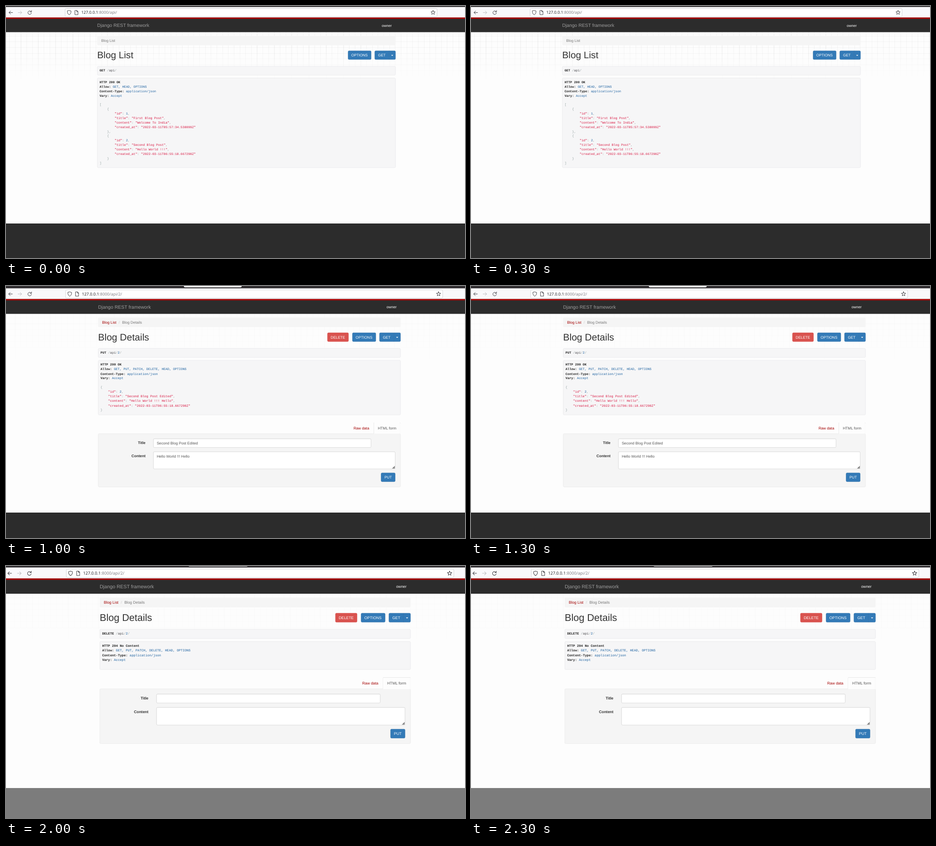
These frames come from a looping animation (1009 px wide and 555 px high, 2.5 s). An HTML page:

```html
<!DOCTYPE html>
<html lang="en">
<head>
<meta charset="utf-8">
<title>Blog API</title>
<style>
html, body { margin: 0; width: 100%; height: 100%; overflow: hidden; background: #fdfdfd; }
* { box-sizing: border-box; }
#stage { position: relative; width: 1009px; height: 555px; overflow: hidden; }
.scene {
  position: absolute; inset: 0; overflow: hidden; background: #fdfdfd; visibility: hidden;
  animation: show 2500ms step-end infinite;
}
@keyframes show {
  0% { visibility: visible; }
  20%, 100% { visibility: hidden; }
}
.page {
  position: absolute; left: 0; top: 0; width: 1140px; transform-origin: 0 0;
  font: 14px/20px "Liberation Sans", Arial, sans-serif; color: #333;
  text-rendering: geometricPrecision;
}
.page div, .page svg { position: absolute; white-space: pre; }
.footer { position: absolute; left: 0; right: 0; bottom: 0; }

.grid {
  background:
    repeating-linear-gradient(90deg, #0000 0 20px, var(--line) 20px 22px),
    repeating-linear-gradient(#0000 0 20px, var(--line) 20px 22px);
  -webkit-mask: linear-gradient(#000 40%, #0000);
  mask: linear-gradient(#000 40%, #0000);
}
.strip { background: #312e31; }
.tab-top { background: #f6f6f7; border-radius: 0 0 5px 5px; }
.tools { background: #f9f9fb; }
.url { background: #fff; border: 1.5px solid #bcbcc2; border-radius: 5px; }
.addr { font: 15.3px/20px "Open Sans", "Noto Sans", sans-serif; color: #77767c; }
.addr b { font-weight: 400; color: #15141a; }
.nav { background: #2c2c2c; border-top: 5px solid #b00505; }
.brand { font-size: 18px; color: #9d9d9d; }
.user { color: #fff; }

.crumbs { background: #f5f5f5; border-radius: 4px; padding: 8px 15px; color: #777; }
.crumbs a, .link { color: #a30000; }
.crumbs s { text-decoration: none; color: #ccc; padding: 0 5px; }
.title { font-size: 36px; line-height: 40px; }
.btn {
  height: 34px; padding: 6px 0; text-align: center; color: #fff;
  background: #337ab7; border: 1px solid #2e6da4; border-radius: 4px;
}
.red { background: #d9534f; border-color: #d43f3a; }
.plain { background: #fff; border-color: #ccc; color: #333; }
.first { border-radius: 4px 0 0 4px; }
.last { border-radius: 0 4px 4px 0; }
.caret { border: 4px solid transparent; border-top-color: #fff; border-bottom: 0; }

.code {
  padding: 8px; background: #f6f6f7; border: 1px solid #e1e1e5; border-radius: 4px;
  font: 12px/17.143px "Liberation Mono", "Courier New", monospace; color: #48484c;
}
.code b { color: #222; }
.code i { font-style: normal; color: #195f9f; }
.code em { font-style: normal; color: #d8143f; }
.code u { text-decoration: none; color: #93a1a1; }

.tab { background: #fdfdfd; border: 1px solid #ddd; border-bottom: 0; border-radius: 4px 4px 0 0; padding: 10px 0; text-align: center; color: #555; }
.well { background: #f5f5f5; border: 1px solid #e3e3e3; border-radius: 4px; }
.label { font-weight: 700; text-align: right; }
.field { background: #fff; border: 1px solid #c6c6c6; border-radius: 4px; padding: 6px 12px; color: #555; box-shadow: inset 0 1px 1px rgba(0,0,0,.075); }
.grip { background: linear-gradient(135deg, #0000 50%, #888 50%); }

.shade { background: rgba(0,0,0,.5); }
.modal { background: #fff; border: 1px solid rgba(0,0,0,.2); border-radius: 6px; box-shadow: 0 5px 15px rgba(0,0,0,.5); }
.ask { font-size: 18px; text-align: center; }
.rule { background: #e5e5e5; }
</style>
</head>
<body>
<div id="stage"></div>
<script>
const LINE = 17.143, RESPONSE_TOP = 231.3;
const METHODS = "GET, PUT, PATCH, DELETE, HEAD, OPTIONS";

const post = (id, title, content, stamp, pad) => [
  `"id": ${id},`, `"title": "${title}",`, `"content": "${content}",`,
  `"created_at": "2022-03-11T${stamp}Z"`
].map(row => pad + row);

const edited = {
  path: "/api/2/", verb: "PUT", status: "200 OK", allow: METHODS,
  body: ["{", ...post(2, "Second Blog Post Edited", "Hello World !!! Hello", "06:55:18.667290", "    "), "}"],
  fields: ["Second Blog Post Edited", "Hello World !!! Hello"], tab: 323
};

const scenes = [
  {
    x: 200.5, y: 25.4, scale: .5754, footer: 479, path: "/api/", verb: "GET",
    status: "200 OK", allow: "GET, HEAD, OPTIONS", list: true, line: "rgba(0,0,0,.035)",
    body: ["[", "    {", ...post(1, "First Blog Post", "Welcome To India", "05:57:34.538099", "        "), "    },",
      "    {", ...post(2, "Second Blog Post", "Hello World !!!", "06:55:18.667290", "        "), "    }", "]"]
  },
  {
    x: 212, y: 27, scale: .6, footer: 492, path: "/api/2/", verb: "GET",
    status: "404 Not Found", allow: METHODS, body: ["{", '    "detail": "Not found."', "}"],
    fields: ["", ""], tab: 550
  },
  { ...edited, x: 202.5, y: 28.7, scale: .5833, footer: 498.5 },
  { ...edited, x: 201.5, y: 28.3, scale: .5855, footer: 555, modal: true },
  {
    x: 206, y: 27.5, scale: .5995, footer: 489, footColor: "#7c7c7c", path: "/api/2/", verb: "DELETE",
    status: "204 No Content", allow: METHODS, body: [], fields: ["", ""], tab: 325
  }
];

const box = (cls, x, y, w, h, html = "") =>
  `<div class="${cls}" style="left:${x}px;top:${y}px;width:${w}px;height:${h}px">${html}</div>`;

const icon = (x, path, color = "#3a393f", size = 20) =>
  `<svg viewBox="-10 -10 20 20" width="${size}" height="${size}" fill="none" stroke="${color}" stroke-width="1.7"
    stroke-linejoin="round" stroke-linecap="round" style="left:${x - size / 2}px;top:${-19 - size / 2}px"><path d="${path}"/></svg>`;

const star = "M" + Array.from({ length: 10 }, (_, k) => {
  const r = k % 2 ? 3.7 : 8.6, a = k * Math.PI / 5;
  return `${(r * Math.sin(a)).toFixed(1)} ${(-r * Math.cos(a)).toFixed(1)}`;
}).join("L") + "Z";

const json = text => text.replace(/("[^"]*")|(\d+)|([[\]{},:])/g, (m, str, num) =>
  str ? `<em>${m}</em>` : num ? `<i>${m}</i>` : `<u>${m}</u>`);

const header = (name, value) => `<b>${name}:</b> <i>${value}</i>`;

function drawBrowser(s) {
  return box("strip", -400, -60, 1900, 20) +
    (s.tab ? box("tab-top", s.tab, -60, 218, 16) : "") +
    box("tools", -400, -40.5, 1900, 41) +
    icon(-330.5, "M7 0H-7M-1 -6L-7 0L-1 6") +
    icon(-295, "M-7 0H7M1 -6L7 0L1 6", "#bdbdc1") +
    icon(-258, "M6 -3A6.8 6.8 0 1 0 6.8 1.5M7 -8V-2.5H1.5") +
    box("url", -123, -35.3, 1422, 32) +
    icon(-107.5, "M0 -8L7 -6C7.5 1 5 6 0 8.5C-5 6 -7.5 1 -7 -6Z") +
    icon(-79, "M-5.5 -8H1.5L5.5 -4V8H-5.5ZM1 -8V-3.5H5.5") +
    box("addr", -61, -29.3, 300, 20, `<b>127.0.0.1</b>:8000${s.path}`) +
    icon(1283, star);
}

function drawHeading(s) {
  const name = s.list ? "Blog List" : "Blog Details";
  const trail = s.list ? name : `<a>Blog List</a> <s>/ </s>${name}`;
  return box("nav", -400, 0, 1900, 56) +
    box("brand", 0, 20, 300, 20, "Django REST framework") +
    box("user", 1087, 20, 40, 20, "owner") +
    box("crumbs", 0, 70, 1140, 36, trail) +
    box("title", 0, 124, 500, 40, name) +
    (s.list ? "" : box("btn red", 863.5, 126.7, 80.5, 34, "DELETE")) +
    box("btn", 957.5, 126.7, 89, 34, "OPTIONS") +
    box("btn first", 1060, 126.7, 55, 34, "GET") +
    box("btn last", 1114, 126.7, 26, 34) +
    box("caret", 1123, 142.5, 8, 4);
}

function drawForm(s, y) {
  return box("well", 0, y + 70, 1140, 202.4) +
    box("link", 962.5, y + 39.4, 70, 20, "Raw data") +
    box("tab", 1038, y + 28.4, 102, 42.6, "HTML form") +
    box("label", 0, y + 95, 178.5, 20, "Title") +
    box("field", 208, y + 89, 821, 34, s.fields[0]) +
    box("label", 0, y + 144, 178.5, 20, "Content") +
    box("field", 208, y + 138, 912, 66, s.fields[1]) +
    box("grip", 1108, y + 192, 10, 10) +
    box("btn", 1066, y + 218.4, 54, 34, "PUT");
}

function drawModal() {
  return box("shade", -400, 0, 1900, 1000) +
    box("modal", 270.5, 31.5, 599, 135.5) +
    box("ask", 271, 54.5, 598, 20, "Are you sure you want to delete this Blog Details?") +
    box("rule", 271.5, 100, 597, 1) +
    box("btn plain", 709, 117, 69.5, 34, "Cancel") +
    box("btn red", 783, 117, 67, 34, "Delete");
}

function drawScene(s, i) {
  const path = s.path.replace(/\//g, "<u>/</u>").replace("2", "<i>2</i>");
  const rows = [`<b>HTTP ${s.status}</b>`, header("Allow", s.allow),
    header("Content-Type", "application/json"), header("Vary", "Accept"), "", ...s.body.map(json)];
  const height = rows.length * LINE + 18;
  return `<div class="scene" style="animation-delay:${i * 500 - 2500}ms">
    <div class="page" style="transform:translate(${s.x}px,${s.y}px) scale(${s.scale});--line:${s.line || "rgba(0,0,0,.012)"}">` +
    box("grid", -400, 50, 1900, 190) + drawBrowser(s) + drawHeading(s) +
    box("code", 0, 186.3, 1140, 35, `<b>${s.verb}</b> ${path}`) +
    box("code", 0, RESPONSE_TOP, 1140, height, rows.join("\n")) +
    (s.list ? "" : drawForm(s, RESPONSE_TOP + height)) +
    (s.modal ? drawModal() : "") +
    `</div><div class="footer" style="top:${s.footer}px;background:${s.footColor || "#2c2c2c"}"></div></div>`;
}

document.getElementById("stage").innerHTML = scenes.map(drawScene).join("");
</script>
</body>
</html>
```
